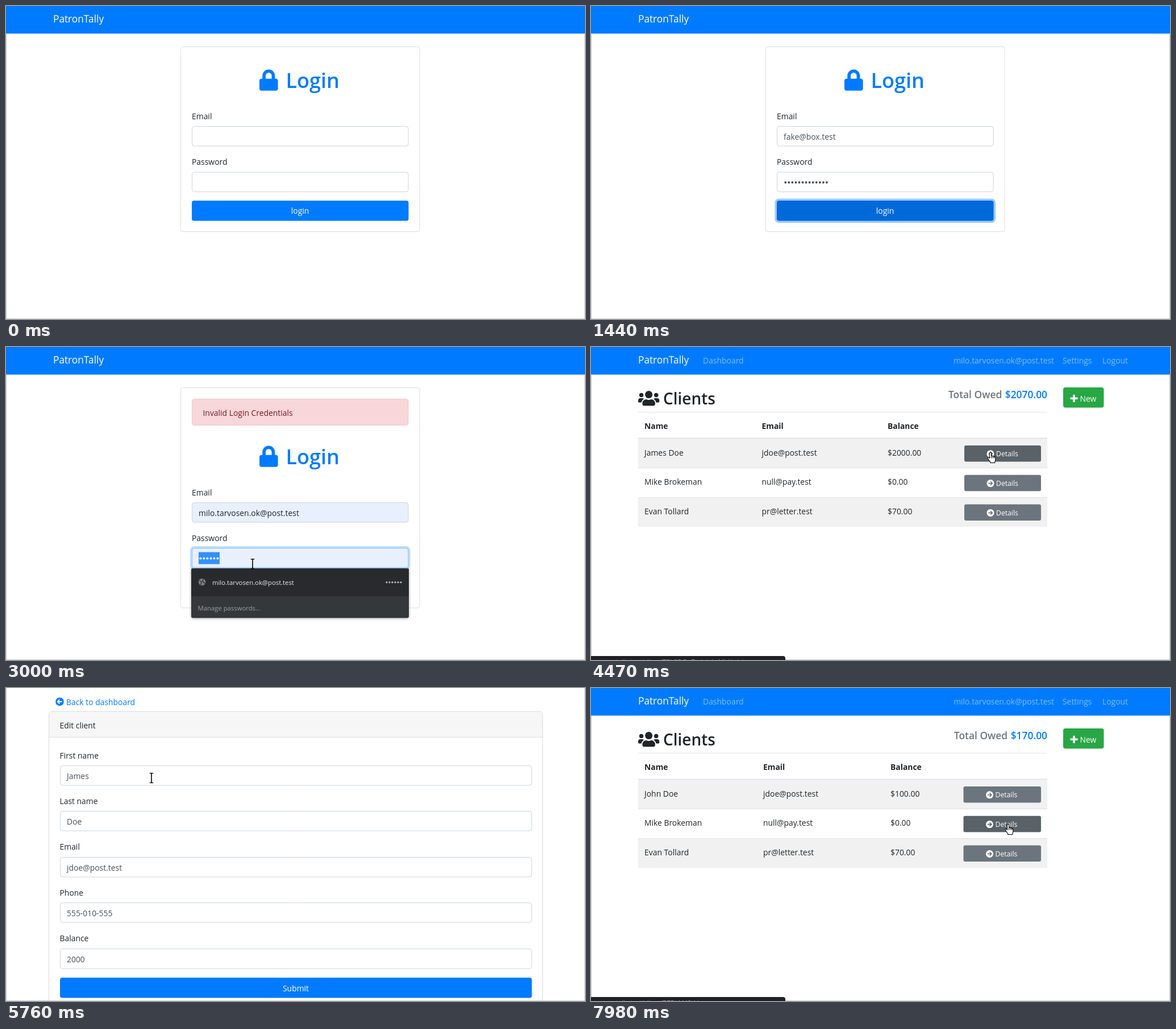
Recreate the animation shown at these times as an HTML page with a canvas. Size 1019 px wide and 550 px high, loop 8000 ms.

```html
<!DOCTYPE html>
<html lang="en">
<head>
<meta charset="utf-8">
<title>Client admin demo</title>
<style>
html, body { margin: 0; width: 100%; height: 100%; overflow: hidden; background: #fff; }
canvas { display: block; width: 1019px; height: 550px; }
</style>
</head>
<body>
<canvas id="stage"></canvas>
<script>
const W = 1019, H = 550, LOOP = 8000;
const canvas = document.getElementById('stage');
const ctx = canvas.getContext('2d');
const dpr = window.devicePixelRatio || 1;
canvas.width = W * dpr;
canvas.height = H * dpr;

const BLUE = '#007bff', INK = '#212529', FIELD_INK = '#495057', LINE = '#ced4da', GREY = '#6c757d';
const BODY = 13.9, SMALL = 11.3;
const BRAND = 'PatronTally';
const USER = 'milo.tarvosen.ok@post.test';
const USER2 = 'marta.volk@post.test';

const LOCK = new Path2D('M400 224h-24v-72C376 68.2 307.8 0 224 0S72 68.2 72 152v72H48c-26.5 0-48 21.5-48 48v192c0 26.5 21.5 48 48 48h352c26.5 0 48-21.5 48-48V272c0-26.5-21.5-48-48-48zm-104 0H152v-72c0-39.7 32.3-72 72-72s72 32.3 72 72v72z');
const SHOULDERS = new Path2D('M396.8 288h-8.3c-20.8 10-43.9 16-68.5 16s-47.6-6-68.5-16h-8.3C179.6 288 128 339.6 128 403.2V432c0 26.5 21.5 48 48 48h288c26.5 0 48-21.5 48-48v-28.8c0-63.6-51.6-115.2-115.2-115.2z');
const SIDE = new Path2D('M173.1 274.6C161.5 263.1 145.6 256 128 256H64c-35.3 0-64 28.7-64 64v32c0 17.7 14.3 32 32 32h65.9c6.3-47.4 34.9-87.3 75.2-109.4z');
const HAND = new Path2D('M-1.7 11V1.6a1.7 1.7 0 0 1 3.4 0V7c.6-1 3-.8 3 .6c.8-.8 2.8-.6 2.9.9c1-.5 2.4 0 2.4 1.4V14c0 2-1.2 3-1.4 5.5H0c-.3-2-2-3.5-3.6-5.6c-1.6-2.2-2.6-3.6-1.5-4.6c1.2-1 2.4.4 3.4 1.7z');
const ARROW = new Path2D('M0 0V20L4.6 15.8L8 23.4L11.3 22L8 14.5H14Z');

// Pointer visits: each track is a run of [time, x, y]; the pointer is hidden in between.
const TRACKS = [
  [[1710, 440, 292], [1860, 440, 292], [2040, 430, 338], [2520, 430, 338], [2670, 434, 381], [3060, 434, 381]],
  [[4200, 944, 150], [4290, 868, 96], [4470, 703, 185], [4980, 700, 190], [5160, 481, 268],
   [5310, 400, 262], [5700, 256, 158], [5940, 256, 158]],
  [[6180, 256, 158], [6330, 256, 388], [6690, 256, 388], [6800, 256, 474], [6900, 256, 474]],
  [[7020, 256, 474], [7140, 480, 526], [7500, 480, 526], [7700, 690, 290], [7850, 714, 190],
   [7980, 734, 239], [8000, 734, 239]]
];

let mouse = null, kind = 'arrow';

const clamp = (v, a, b) => Math.max(a, Math.min(b, v));
const smooth = v => { v = clamp(v, 0, 1); return v * v * (3 - 2 * v); };
const typed = (t, start, step, n) => clamp(Math.floor((t - start) / step) + 1, 0, n);

function pointerAt(t) {
  const track = TRACKS.find(k => t >= k[0][0] && t < k[k.length - 1][0]);
  if (!track) return null;
  const i = track.findIndex(k => k[0] > t);
  const [t0, x0, y0] = track[i - 1], [t1, x1, y1] = track[i];
  const e = smooth((t - t0) / (t1 - t0));
  return { x: x0 + (x1 - x0) * e, y: y0 + (y1 - y0) * e };
}

function hit(x, y, w, h, type) {
  const inside = mouse && mouse.x >= x && mouse.x <= x + w && mouse.y >= y && mouse.y <= y + h;
  if (inside) kind = type;
  return inside;
}

function rect(x, y, w, h, fill) {
  ctx.fillStyle = fill;
  ctx.fillRect(x, y, w, h);
}

function box(x, y, w, h, r, fill, stroke) {
  ctx.beginPath();
  ctx.roundRect(x, y, w, h, r);
  if (fill) { ctx.fillStyle = fill; ctx.fill(); }
  if (stroke) { ctx.strokeStyle = stroke; ctx.lineWidth = 1; ctx.stroke(); }
}

function disc(x, y, r, fill) {
  ctx.beginPath();
  ctx.arc(x, y, r, 0, 7);
  ctx.fillStyle = fill;
  ctx.fill();
}

function setFont(size, weight) {
  ctx.font = `${weight} ${size}px "Open Sans", "Noto Sans", sans-serif`;
}

// cy is the middle of the capital letters
function text(s, x, cy, color = INK, size = BODY, weight = 400, align = 'left') {
  setFont(size, weight);
  ctx.textAlign = align;
  ctx.fillStyle = color;
  ctx.fillText(s, x, cy + size * 0.36);
  return ctx.measureText(s).width;
}

function dots(n, x, cy, color, pitch = 6.05, r = 2) {
  for (let i = 0; i < n; i++) disc(x + i * pitch, cy, r, color);
}

function ring(x, y, w, h, alpha) {
  box(x - 3.5, y - 3.5, w + 7, h + 7, 7, `rgba(0,123,255,${alpha})`);
}

function field(x, y, w, o) {
  const h = 34.5, cy = y + 18;
  hit(x, y, w, h, 'text');
  if (o.focus) ring(x, y, w, h, 0.25);
  box(x, y, w, h, 4, o.filled ? '#e8f0fe' : '#fff', o.focus ? '#80bdff' : LINE);
  const ink = o.filled ? INK : FIELD_INK;
  setFont(BODY, 400);
  const width = o.dots !== undefined ? o.dots * 6.05 : ctx.measureText(o.value).width;
  if (o.selected) rect(x + 11.5, cy - 11, width + 0.7, 21, '#3390ff');
  const color = o.selected ? '#fff' : ink;
  if (o.dots !== undefined) dots(o.dots, x + 14.8, cy, color);
  else text(o.value, x + 11.5, cy, color);
  if (o.focus && !o.selected) rect(Math.round(x + 12 + width), cy - 9, 1, 18, INK);
}

function arrowIcon(x, y, r, dir, fill, cut) {
  disc(x, y, r, fill);
  ctx.save();
  ctx.translate(x, y);
  ctx.scale(dir * r / 6.5, r / 6.5);
  ctx.beginPath();
  ctx.moveTo(-3.7, 0); ctx.lineTo(3.2, 0);
  ctx.moveTo(0, -3.4); ctx.lineTo(3.4, 0); ctx.lineTo(0, 3.4);
  ctx.strokeStyle = cut;
  ctx.lineWidth = 1.6;
  ctx.stroke();
  ctx.restore();
}

function icon(x, y, scale, color, draw) {
  ctx.save();
  ctx.translate(x, y);
  ctx.scale(scale, scale);
  ctx.fillStyle = color;
  draw();
  ctx.restore();
}

function usersIcon() {
  disc(320, 144, 112, INK);
  disc(96, 160, 64, INK);
  disc(544, 160, 64, INK);
  ctx.fill(SHOULDERS);
  ctx.fill(SIDE);
  ctx.translate(640, 0);
  ctx.scale(-1, 1);
  ctx.fill(SIDE);
}

function nav(dx, dy, member) {
  rect(0, dy, W, 48.5, BLUE);
  text(BRAND, 83 + dx, 23 + dy, '#fff', 17.3);
  if (!member) return;
  const dim = 'rgba(255,255,255,.5)';
  text('Dashboard', 197 + dx, 23.5 + dy, dim);
  text(USER, 815 + dx, 23.5 + dy, dim, BODY, 400, 'right');
  text('Settings', 830 + dx, 23.5 + dy, dim);
  text('Logout', 945 + dx, 23.5 + dy, dim, BODY, 400, 'right');
}

function frameLines(top) {
  const c = '#cbcbcb';
  rect(0, top, 1, H - top, c);
  rect(W - 1, top, 1, H - top, c);
  rect(0, H - 1, W, 1, c);
}

function savedLogins(y, names) {
  const rows = 4 + 45 * names.length;
  ctx.save();
  ctx.shadowColor = 'rgba(0,0,0,.4)';
  ctx.shadowBlur = 4;
  ctx.shadowOffsetY = 1;
  box(326, y, 383, rows + 38, 3, '#35383a');
  ctx.restore();
  box(326, y, 383, rows, [3, 3, 0, 0], '#292a2d');
  hit(326, y, 383, rows + 38, 'arrow');
  names.forEach((name, i) => {
    const cy = y + 24.5 + 45 * i;
    disc(345, cy - 0.5, 6.2, '#7d8084');
    ctx.strokeStyle = '#292a2d';
    ctx.lineWidth = 1.3;
    ctx.beginPath();
    ctx.moveTo(340, cy - 3); ctx.lineTo(344, cy - 1); ctx.lineTo(343, cy + 5);
    ctx.moveTo(347, cy - 6); ctx.lineTo(346, cy - 2); ctx.lineTo(350, cy + 2);
    ctx.stroke();
    text(name, 363, cy, '#e8eaed', SMALL);
    dots(6, 670, cy, '#a9acb0', 5, 1.7);
  });
  text('Manage passwords...', 337.5, y + rows + 20.5, '#9aa0a6', SMALL);
}

function loginPage(t) {
  const failed = t >= 1620, dy = failed ? 62 : 0;
  nav(0, 0, false);
  frameLines(48.5);
  box(307.5, 71.5, 420.5, 325 + dy, 4, '#fff', '#dcdcdc');
  if (failed) {
    box(327.5, 91.5, 380.5, 46, 4, '#f8d7da', '#f5c6cb');
    text('Invalid Login Credentials', 346.5, 115.5, '#721c24');
  }
  icon(446, 111.5 + dy, 37.3 / 512, BLUE, () => ctx.fill(LOCK));
  text('Login', 492.5, 131.5 + dy, BLUE, 36, 600);

  const picked = t >= 2100;
  const onEmail = failed ? t >= 1710 && t < 2670 : t >= 60 && t < 690;
  const onPass = failed ? t >= 2670 : t >= 690 && t < 1380;
  const mail = failed ? (picked ? USER : '') : 'fake@box.test'.slice(0, typed(t, 180, 36, 13));
  const retyped = t >= 3060;
  const count = !failed ? typed(t, 930, 30, 13) : retyped ? typed(t, 3060, 30, 6) : picked ? 6 : 0;

  text('Email', 327, 193.5 + dy);
  text('Password', 327, 274 + dy);
  field(327.5, 211.5 + dy, 380.5, { value: mail, focus: onEmail, filled: picked });
  field(327.5, 292 + dy - (failed ? 0.5 : 0), 380.5, {
    dots: count, focus: onPass, filled: picked && !retyped,
    selected: t >= 2760 && !retyped
  });

  const pressed = !failed && t >= 1380;
  if (pressed) ring(327, 342, 381.5, 35.5, 0.4);
  box(327, 342 + dy, 381.5, 35.5, 4, pressed ? '#0069d9' : BLUE);
  text('login', 517.5, 360 + dy, '#fff', BODY, 400, 'center');

  if (t >= 60 && t < 180) savedLogins(247, [USER, USER2]);
  if (t >= 690 && t < 930) savedLogins(327.5, [USER, USER2]);
  if (t >= 1710 && t < 2100) savedLogins(309, [USER, USER2]);
  if (t >= 2670 && t < 3060) savedLogins(389, [USER]);
}

function statusBar(label, alpha) {
  ctx.globalAlpha = alpha;
  box(-4, 543, 346, 12, [0, 4, 0, 0], '#202124');
  text(label, 8, 552.5, '#a5a8ac', 11.5);
  ctx.globalAlpha = 1;
}

function dashboard(t) {
  const saved = t > 7000;
  const clients = [
    saved ? ['John Doe', 'jdoe@post.test', '$100.00'] : ['James Doe', 'jdoe@post.test', '$2000.00'],
    ['Mike Brokeman', 'null@pay.test', '$0.00'],
    ['Evan Tollard', 'pr@letter.test', '$70.00']
  ];
  const cols = saved ? [94, 303, 527] : [94, 300.5, 522];
  const bx = saved ? 655.5 : 657;
  nav(0, 0, true);
  frameLines(48.5);
  icon(83, 75.2, 37.3 / 640, INK, usersIcon);
  text('Clients', 127, 91, INK, 28, 600);

  const owed = text(saved ? '$170.00' : '$2070.00', 803, 83.5, BLUE, 17.4, 600, 'right');
  text('Total Owed', 803 - owed - 5.5, 83.5, GREY, 17.4, 600, 'right');

  const onNew = hit(831, 71, 71.5, 35.5, 'hand');
  box(831, 71, 71.5, 35.5, 4, onNew ? '#218838' : '#28a745');
  box(843.5, 88.6, 13.2, 3.4, 1, '#fff');
  box(848.4, 83.7, 3.4, 13.2, 1, '#fff');
  text('New', 860.5, 90.5, '#fff');

  rect(83, 114, 720, 1, '#e5e5e5');
  ['Name', 'Email', 'Balance'].forEach((s, i) => text(s, cols[i], 138.5, INK, BODY, 700));
  rect(83, 159.5, 720, 2, '#dee2e6');

  let over = false;
  clients.forEach((row, i) => {
    const y = 161 + 51.8 * i;
    if (i % 2 === 0) rect(83, y, 720, 51.5, '#f1f1f1');
    if (i) rect(83, Math.round(y) - 1, 720, 1, '#dee2e6');
    row.forEach((s, j) => text(s, cols[j], y + 24.5));
    const hot = hit(bx, y + 12, 792 - bx, 28.5, 'hand');
    over = over || hot;
    const fill = hot ? '#5a6268' : GREY;
    box(bx, y + 12, 792 - bx, 28.5, 3, fill);
    arrowIcon(bx + 46, y + 26.8, 6.5, 1, '#fff', fill);
    text('Details', bx + 56, y + 27, '#fff', 12.2);
  });

  if (over) statusBar(saved ? 'patrontally.test/client/B7RkM42tLh' : 'patrontally.test/client/7Rk2DQoTscLdghtMbKq/view', 1);
  else if (t < 3990) statusBar('Waiting for patrontally.test...', 1 - smooth((t - 3750) / 240));
}

function phoneValue(t) {
  const cut = typed(t, 6390, 30, 3);
  return '555-010-555'.slice(0, 11 - cut) + '444'.slice(0, typed(t, 6490, 50, 3));
}

function editPage(t) {
  const scroll = 66 * smooth((t - 5380) / 300);
  const focus = t < 5850 ? -1 : t < 6330 ? 0 : t < 6780 ? 3 : t < 7140 ? 4 : -1;
  const values = [
    t < 5940 ? 'James' : 'John'.slice(0, typed(t, 5940, 50, 4)),
    'Doe', 'jdoe@post.test', phoneValue(t),
    t < 6900 ? '2000' : '100'.slice(0, typed(t, 6900, 60, 3))
  ];
  const selected = t >= 5880 && t < 5940 || t >= 6810 && t < 6900;

  nav(-7.5, -scroll, true);
  frameLines(Math.max(0, 48.5 - scroll));
  const y = -scroll;
  arrowIcon(94.5, 90 + y, 7.3, -1, BLUE, '#fff');
  text('Back to dashboard', 106, 90.5 + y, BLUE);

  box(75.5, 107.5 + y, 869, 521, 4, '#fff', '#dcdcdc');
  box(76, 108 + y, 868, 44.5, [4, 4, 0, 0], '#f6f6f6');
  rect(76, 152 + y, 868, 1, '#dcdcdc');
  text('Edit client', 94.5, 131.5 + y);

  ['First name', 'Last name', 'Email', 'Phone', 'Balance'].forEach((label, i) => {
    const fy = y + 80.4 * i;
    text(label, 94.5, 184.5 + fy);
    field(95.5, Math.round(203 + fy) - 0.5, 829.5, {
      value: values[i], focus: focus === i, selected: focus === i && selected
    });
  });

  const hot = hit(95, 575 + y, 830.5, 35.5, 'hand');
  if (t >= 7140) ring(95, 575 + y, 830.5, 35.5, 0.4);
  box(95, 575 + y, 830.5, 35.5, 4, hot ? '#0069d9' : BLUE);
  text('Submit', 510, 593.5 + y, '#fff', BODY, 400, 'center');
  rect(0, H - 1, W, 1, '#cbcbcb');
}

function drawPointer() {
  if (!mouse) return;
  ctx.save();
  ctx.translate(mouse.x, mouse.y);
  ctx.lineJoin = 'round';
  if (kind === 'text') {
    ctx.translate(Math.round(mouse.x) - mouse.x, 0);
    rect(-0.8, -8.5, 1.6, 17, '#000');
    rect(-3.2, -9, 6.4, 1.4, '#000');
    rect(-3.2, 7.8, 6.4, 1.4, '#000');
  } else if (kind === 'hand') {
    ctx.scale(0.88, 0.95);
    ctx.fillStyle = '#fff';
    ctx.fill(HAND);
    ctx.strokeStyle = '#000';
    ctx.lineWidth = 1.2;
    ctx.stroke(HAND);
    ctx.beginPath();
    for (const x of [1.7, 4.7, 7.5]) { ctx.moveTo(x, 7.5); ctx.lineTo(x, 11); }
    ctx.stroke();
  } else {
    ctx.scale(0.92, 1);
    ctx.strokeStyle = '#fff';
    ctx.lineWidth = 1.6;
    ctx.stroke(ARROW);
    ctx.fillStyle = '#000';
    ctx.fill(ARROW);
  }
  ctx.restore();
}

function draw(t) {
  mouse = pointerAt(t);
  kind = 'arrow';
  ctx.setTransform(dpr, 0, 0, dpr, 0, 0);
  rect(0, 0, W, H, '#fff');
  if (t < 3750) loginPage(t);
  else if (t >= 5010 && t < 7350) editPage(t);
  else dashboard(t);
  drawPointer();
}

const start = performance.now();
function tick() {
  draw((performance.now() - start) % LOOP);
  requestAnimationFrame(tick);
}
tick();
</script>
</body>
</html>
```
